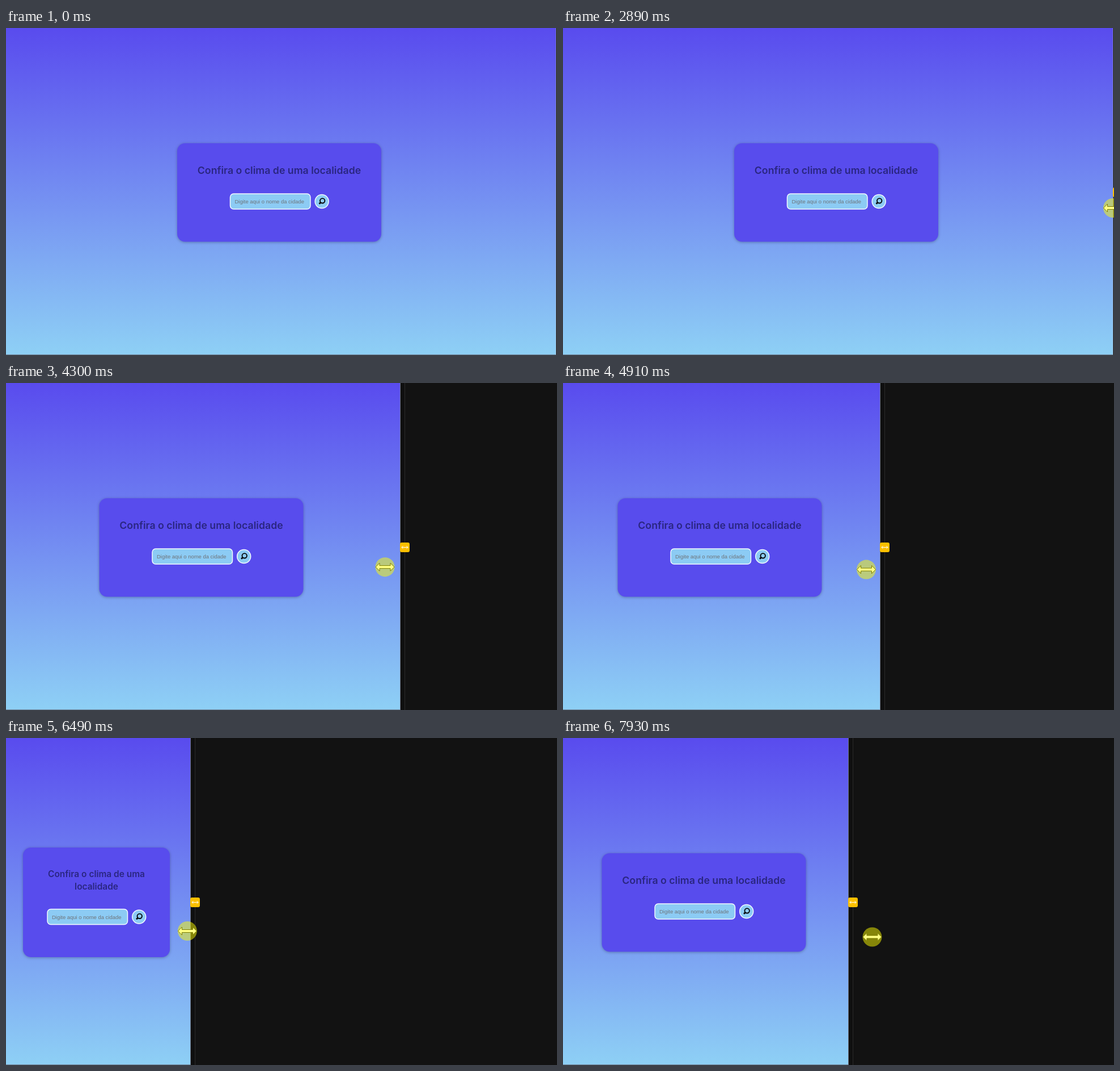
An HTML page for the animation above (8 s loop, 972 px wide and 576 px high).

```html
<!DOCTYPE html>
<html lang="pt">
<head>
<meta charset="utf-8">
<style>
  html, body { margin: 0; width: 100%; height: 100%; overflow: hidden; background: #121212; }
  svg { display: block; width: 972px; height: 576px; }
  .title { font: 600 17.7px Inter, sans-serif; fill: #2a2681; text-anchor: middle; }
  .small { font-size: 15.45px; }
  .hint { font: 9.46px "Liberation Sans", Arial, sans-serif; fill: #6f7378; }
  .field { fill: #8ccbf4; stroke: #f6fbff; stroke-width: 1.45; }
  .card { fill: #584ced; filter: drop-shadow(0 1.5px 2.5px rgba(0, 0, 0, .28)); }
</style>
</head>
<body>
<svg viewBox="0 0 972 576">
  <defs>
    <linearGradient id="sky" x2="0" y2="1">
      <stop stop-color="#594bee"/>
      <stop offset="1" stop-color="#8ed0f5"/>
    </linearGradient>
  </defs>
  <rect width="972" height="576" fill="#121212"/>
  <rect id="page" height="576" fill="url(#sky)"/>
  <rect id="floor" y="575" height="1" fill="#71869c"/>

  <g id="edge">
    <rect width="8" height="576" fill="#0f0f0f"/>
    <rect width="1" height="576" fill="#6d7482"/>
    <rect x="8" width="1" height="576" fill="#2b2b2b"/>
    <g id="grip">
      <rect y="281" width="17" height="17" rx="3" fill="#fcc000"/>
      <path d="M3 289.5H14M5.5 287L3 289.5L5.5 292M11.5 287L14 289.5L11.5 292" fill="none" stroke="#fff"/>
    </g>
  </g>

  <g id="panel">
    <g id="wide">
      <rect class="card" x="-180" y="203" width="360" height="173.5" rx="14"/>
      <text class="title" y="257">Confira o clima de uma localidade</text>
    </g>
    <g id="narrow">
      <rect class="card" x="-129.5" y="193" width="259" height="193" rx="14"/>
      <text class="title small" y="244.5">Confira o clima de uma</text>
      <text class="title small" y="266.5">localidade</text>
    </g>
    <g id="search">
      <rect class="field" x="-86.5" y="292" width="141.5" height="27" rx="6"/>
      <text class="hint" x="-78.5" y="309">Digite aqui o nome da cidade</text>
      <circle class="field" cx="75.2" cy="305.5" r="12"/>
      <g fill="none" stroke="#050505">
        <circle cx="76.2" cy="304.3" r="4.2" stroke-width="1.9"/>
        <path d="M73.2 307.3L70.5 309.8" stroke-width="2.7"/>
      </g>
    </g>
  </g>

  <path id="pointer" d="M0 0V23.5L5 18.8L8.5 26.5L12 25L8.7 17.5H16.5Z" fill="#fff" stroke="#000"/>
  <g id="resizer">
    <path d="M-16.5 0L-9.5-7V-2.5H9.5V-7L16.5 0L9.5 7V2.5H-9.5V7Z" fill="#fff" stroke="#000"/>
    <circle r="17" fill="#ff0" opacity=".49"/>
  </g>
</svg>
<script>
  const LOOP = 8000, STEP = 68.3;
  const ENTER = 960, ARRIVE = 1600, PRESS = 2800, DRAG = 3320;
  const NARROW_BELOW = 376;
  const LEAD = 120; // the dragged edge trails the cursor by this many ms

  // Page width at the turns of the drag: [ms, px].
  const turns = [[DRAG, 970], [4100, 740], [4918, 559], [5670, 408],
                 [6490, 325], [6840, 310], [7370, 310], [8050, 548]];

  const mix = (a, b, p) => a + (b - a) * p;
  const progress = (t, from, to) => Math.min(1, Math.max(0, (t - from) / (to - from)));

  const pageWidth = t => turns.slice(1).reduce(
    (width, [time, next], i) => mix(width, next, progress(t, turns[i][0], time)), turns[0][1]);

  function cursorAt(t) {
    if (t >= PRESS) return [pageWidth(t + LEAD), mix(317, 351, progress(t, DRAG, LOOP))];
    const enter = progress(t, ENTER, ARRIVE), settle = progress(t, ARRIVE, PRESS);
    const swing = 22 * Math.sin(Math.PI * enter);
    return [mix(968, 960, enter) - swing + 10 * settle, mix(511, 353, enter) - 36 * settle];
  }

  const el = id => document.getElementById(id);
  const move = (id, x, y) => el(id).setAttribute('transform', `translate(${x} ${y})`);
  const show = (id, on) => el(id).setAttribute('visibility', on ? 'visible' : 'hidden');

  function draw(now) {
    const t = Math.floor(now % LOOP / STEP + 0.13) * STEP;
    const width = Math.round(pageWidth(t));
    const cursor = cursorAt(t);
    const narrow = width < NARROW_BELOW, pressed = t >= PRESS;

    el('page').setAttribute('width', width);
    el('floor').setAttribute('width', width);
    move('edge', width, 0);
    move('panel', width / 2 - 3, 0);
    move('search', 0, narrow ? 9.5 : 0);
    move('pointer', ...cursor);
    move('resizer', ...cursor);
    show('wide', !narrow);
    show('narrow', narrow);
    show('grip', pressed);
    show('pointer', t >= ENTER - STEP / 2 && !pressed);
    show('resizer', pressed);
  }

  const start = performance.now();
  function tick() {
    draw(performance.now() - start);
    requestAnimationFrame(tick);
  }
  tick();
</script>
</body>
</html>
```
